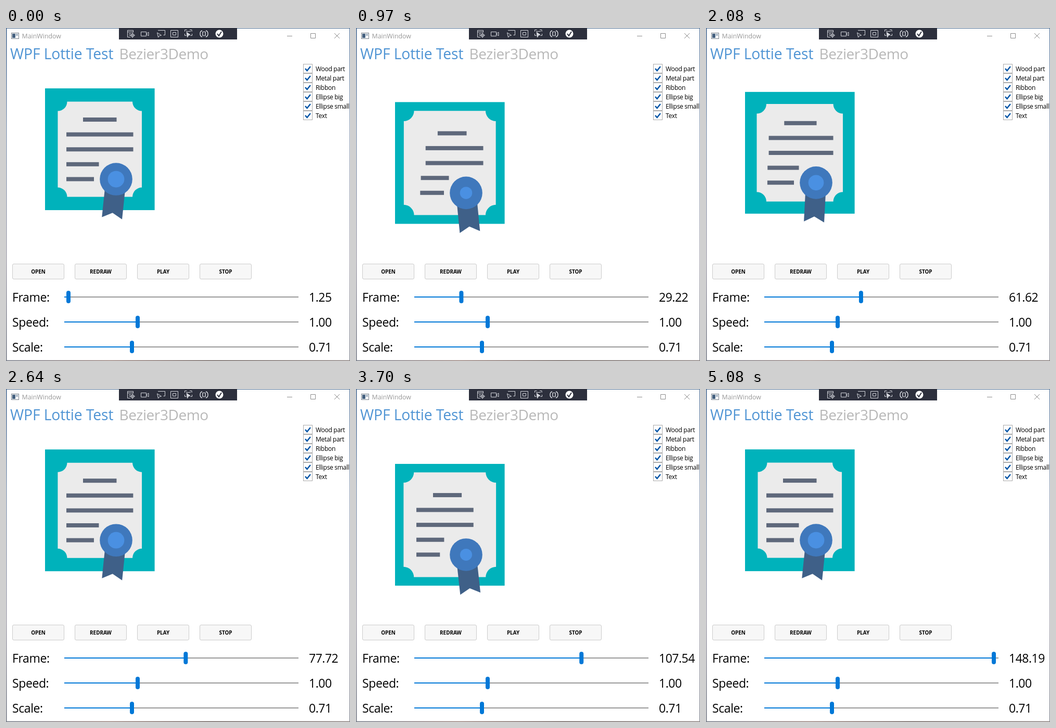
These frames come from a looping animation (661 by 640 pixels, 5150 ms). An HTML page:

```html
<!DOCTYPE html>
<html lang="en">
<head>
<meta charset="utf-8">
<title>MainWindow</title>
<style>
  html, body { margin: 0; width: 100%; height: 100%; overflow: hidden; background: #fff; }
  svg { display: block; width: 661px; height: 640px; }
  text { font-family: "Open Sans", "Noto Sans", sans-serif; }
  .label { font-size: 23px; letter-spacing: -.4px; }
  .value { font-size: 23px; letter-spacing: -.5px; }
  .check { font-size: 12px; letter-spacing: -.3px; }
  .button { font-size: 9.9px; font-weight: 700; text-anchor: middle; }
  .line { fill: none; stroke-width: 1; }
</style>
</head>
<body>
<svg viewBox="0 0 661 640">
  <defs>
    <linearGradient id="edge" x2="0" y2="1">
      <stop offset="0" stop-color="#41648f"/>
      <stop offset=".3" stop-color="#8c9db5"/>
      <stop offset=".7" stop-color="#a5a3ae"/>
      <stop offset="1" stop-color="#6f7480"/>
    </linearGradient>
    <linearGradient id="floor">
      <stop offset="0" stop-color="#777c88"/>
      <stop offset=".3" stop-color="#9b8580"/>
      <stop offset=".6" stop-color="#6d625f"/>
      <stop offset="1" stop-color="#8e8583"/>
    </linearGradient>
  </defs>
  <rect width="661" height="640" fill="#fff"/>
  <rect width="1.5" height="640" fill="url(#edge)"/>
  <rect x="660" width="1" height="640" fill="url(#edge)"/>
  <rect width="661" height="1" fill="#4d6d92"/>
  <rect y="638.5" width="661" height="1.5" fill="url(#floor)"/>

  <!-- Title bar -->
  <rect x="10.5" y="9.5" width="14" height="11" fill="#fff" stroke="#77808a"/>
  <rect x="12" y="11" width="6" height="8" fill="#44607f"/>
  <rect x="19" y="11" width="4" height="4" fill="#a9b7c6"/>
  <text x="30.5" y="20" font-size="12.4" fill="#999">MainWindow</text>
  <path class="line" stroke="#8a8a8a" d="M540 15.5h10M585.5 10.5h9v9h-9zM631 10l10 10M641 10l-10 10"/>

  <!-- Debug toolbar -->
  <rect x="217" width="227" height="22" fill="#2d303d"/>
  <g class="line" stroke="#d6d8de">
    <path d="M239 17.500h-5.500v-13h11v4M233.500 7.500h11M236 10.500h4M236 13.500h3"/>
    <circle cx="243" cy="14" r="3"/>
    <path d="M243 9v10M238 14h10"/>
    <path d="M259.500 7.500h10v8h-10zM270 11l4-3v7l-4-3"/>
    <path d="M292 4.500h13.500v9h-3M290.500 9l8 5-4 1-2 3z"/>
    <path d="M316.500 4.500h14v13h-14zM320.500 8.500h6v5h-6z"/>
    <path d="M343.500 7v-3.500h4M353 3.500h4v3.500M343.500 11v3.500h3M357.500 11v3.500h-3M346 6.500h9"/>
    <path d="M347 8l7 5-3.500 1-2 4z" fill="#d6d8de"/>
    <path d="M377 5q-4 1-4 6t4 6M384 5q4 1 4 6t-4 6M380 7q-2 0-2 2t-1 2q1 0 1 2t2 2M381 7q2 0 2 2t1 2q-1 0-1 2t-2 2" stroke-width="1.500"/>
  </g>
  <circle cx="410" cy="11" r="7.500" fill="#fff"/>
  <path d="M406 11l3 4 5-8" fill="none" stroke="#2d303d" stroke-width="2"/>

  <text x="8" y="60" font-size="28.300" letter-spacing="-.14" fill="#4f94d4">WPF Lottie Test</text>
  <text x="217.500" y="60" font-size="28" letter-spacing="-.42" fill="#b8b8b8">Bezier3Demo</text>

  <g id="certificate">
    <rect x="75" y="116" width="210.600" height="234" fill="#00b2bb"/>
    <path id="paper" fill="#ebebeb"
      d="M117.500 141.500H243A18 18 0 0 0 261 159.500V306.500A18 18 0 0 0 243 324.500H117.500A18 18 0 0 0 99.500 306.500V159.500A18 18 0 0 0 117.500 141.500z"/>
    <g id="lines" fill="#5e687b"></g>
    <path id="ribbon" fill="#3f6088" d="M192 290h39v76l-19.500-10.500L192 366z"/>
    <circle cx="211.500" cy="290.500" r="31.300" fill="#3f78bc"/>
    <circle id="core" cx="211.500" cy="290.500" fill="#4a90e2"/>
  </g>
  <g id="controls"></g>
</svg>
<script>
const LOOP = 5150, HALF = 37.5;
const $ = id => document.getElementById(id);

function add(parent, tag, attrs, text) {
  const node = document.createElementNS("http://www.w3.org/2000/svg", tag);
  for (const key in attrs) node.setAttribute(key, attrs[key]);
  if (text) node.textContent = text;
  return parent.appendChild(node);
}

const controls = $("controls");

["Wood part", "Metal part", "Ribbon", "Ellipse big", "Ellipse small", "Text"].forEach((name, i) => {
  const y = 69 + 18 * i;
  add(controls, "rect", { x: 571.5, y: y + .5, width: 17, height: 17, fill: "#fff", stroke: "#aaa" });
  add(controls, "path", { d: `M575 ${y + 9}l3.500 4 6.500-8`, fill: "none", stroke: "#0756a6", "stroke-width": 2.6 });
  add(controls, "text", { x: 595, y: y + 14, class: "check" }, name);
});

["OPEN", "REDRAW", "PLAY", "STOP"].forEach((name, i) => {
  const x = 12 + 120 * i;
  add(controls, "rect", { x: x + .5, y: 453.5, width: 99, height: 29, rx: 2.5, fill: "#f7f7f7", stroke: "#ccc" });
  add(controls, "text", { x: x + 50, y: 472, class: "button" }, name);
});

function slider(name, y, x, value) {
  add(controls, "text", { x: 12, y: y + 9, class: "label" }, name);
  add(controls, "rect", { x: 112, y: y - 1, width: 450, height: 2, fill: "#999" });
  const fill = add(controls, "rect", { x: 112, y: y - 1, height: 2, fill: "#0078d7" });
  const thumb = add(controls, "rect", { y: y - 12, width: 8, height: 24, rx: 4, fill: "#0078d7" });
  const label = add(controls, "text", { x: 582, y: y + 9, class: "value" });
  const set = (x, value) => {
    fill.setAttribute("width", x - 112);
    thumb.setAttribute("x", x - 4);
    label.textContent = value.toFixed(2);
  };
  set(x, value);
  return set;
}
const setFrame = slider("Frame:", 517, 120, 1.25);
slider("Speed:", 565, 253, 1);
slider("Scale:", 613, 242, .71);

// Text lines as [left, right, centre y]
const lines = [[148, 212.5, 176], [116, 244.5, 204.5], [116, 244.5, 233.2], [116, 178.5, 261.8], [116, 169, 290.4]]
  .map(([left, right, y]) => ({
    left, right, node: add($("lines"), "rect", { y: y - 4, height: 8 })
  }));

// The picture updates in bursts of eight even steps
const bursts = [[70, 550], [620, 1090], [1170, 1660], [1730, 2220], [2290, 2780],
  [2850, 3340], [3410, 3900], [3950, 4450], [4520, 5010]];
const steps = [0, ...bursts.flatMap(([a, b]) =>
  Array.from({ length: 8 }, (_, i) => Math.round((a + (b - a) * i / 7) / 10) * 10)), 5080];

// Playback counter at known times, linear between
const counter = [[0, 1.25], [550, 17.28], [1450, 43.5], [2080, 61.62], [3130, 91.8], [3700, 107.82], [5080, 148.19]];
function frameAt(t) {
  const i = Math.max(1, counter.findIndex(([time]) => time >= t));
  const [t0, v0] = counter[i - 1], [t1, v1] = counter[i];
  return v0 + (v1 - v0) * (t - t0) / (t1 - t0);
}

// cubic-bezier(.5, 0, .5, 1)
function ease(x) {
  let low = 0, high = 1;
  for (let i = 0; i < 24; i++) {
    const s = (low + high) / 2;
    if (1.5 * s * (1 - s) + s ** 3 < x) low = s; else high = s;
  }
  return 3 * low ** 2 - 2 * low ** 3;
}

function draw(t) {
  const frame = frameAt(steps.findLast(step => step <= t));
  const e = ease(1 - Math.abs(frame % (2 * HALF) / HALF - 1));
  $("certificate").setAttribute("transform", `translate(0 ${28.7 * e})`);
  $("paper").setAttribute("transform",
    `translate(180.3 233) scale(${1 + .103 * e}) translate(-180.3 -233)`);
  $("ribbon").setAttribute("transform", `rotate(${6 - 12.6 * e} 211.5 290.5)`);
  $("core").setAttribute("r", 15.9 - 4.5 * e);
  for (const { left, right, node } of lines) {
    const width = (right - left) * (1 - .15 * e);
    node.setAttribute("x", frame < 2 * HALF ? right - width : left);
    node.setAttribute("width", width);
  }
  setFrame(116.3 + 2.947 * frame, frame);
}

const start = performance.now();
function tick() {
  draw((performance.now() - start) % LOOP);
  requestAnimationFrame(tick);
}
tick();
</script>
</body>
</html>
```
